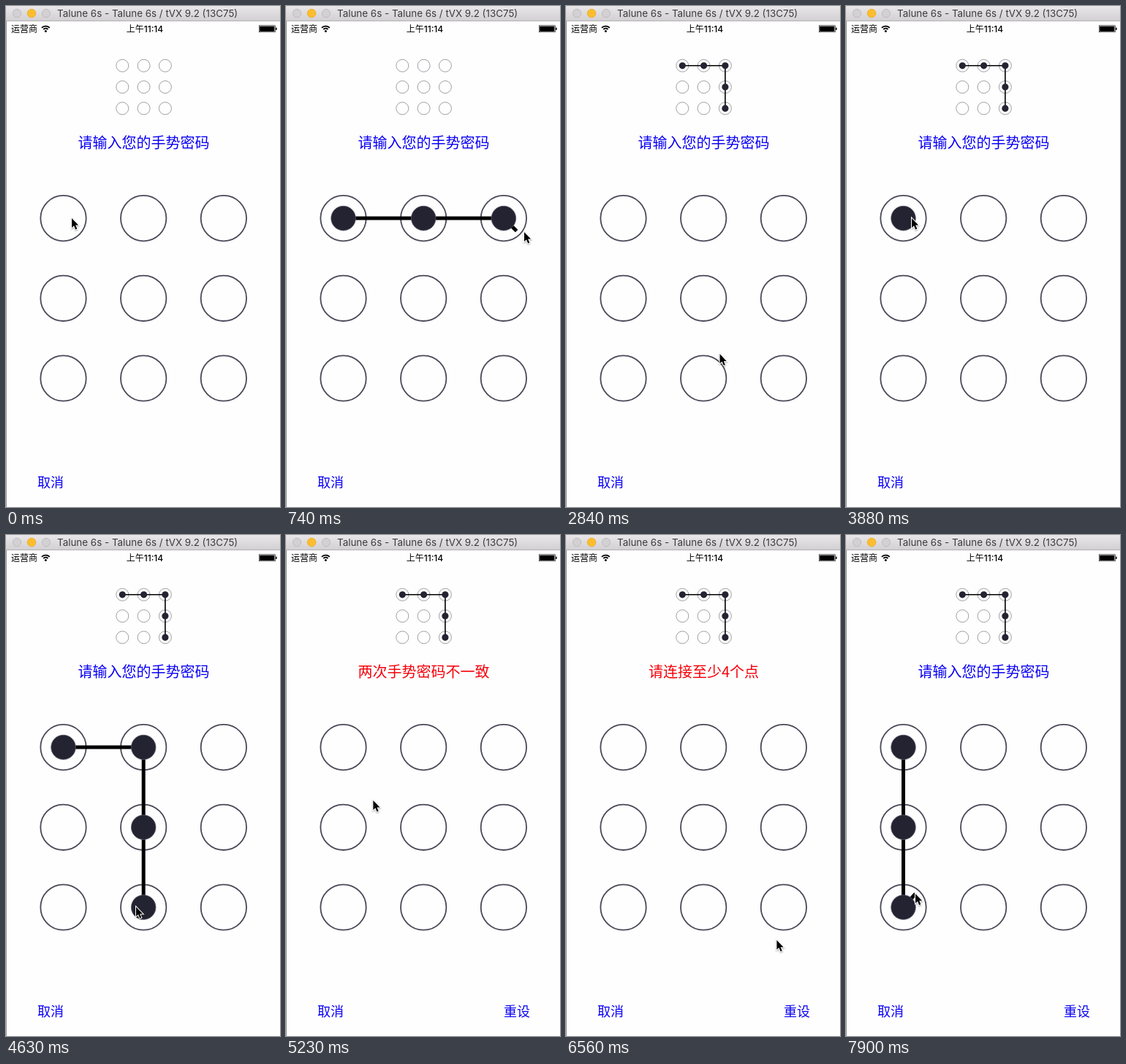
Animation, 375 px wide and 687 px high, one loop 8 s. Source, as an HTML page with a canvas:

```html
<!DOCTYPE html>
<html lang="zh-CN">
<head>
<meta charset="utf-8">
<style>
  html, body { margin: 0; width: 100%; height: 100%; overflow: hidden; background: #fff; }
  canvas { display: block; }
</style>
</head>
<body>
<canvas id="stage" width="375" height="687"></canvas>
<script>
const ctx = document.getElementById('stage').getContext('2d');
const LOOP = 8000, TICK = 149.1, TICK_SHIFT = 9.2, TOUCH_LAG = 0.15;
const INK = '#242331', BLUE = '#0a00f5', RED = '#f5000a';
const CJK = '"Noto Sans CJK SC", "Noto Sans CJK", sans-serif';
const PROMPT = '请输入您的手势密码';

const grid = (x, y, gap) =>
  Array.from({ length: 9 }, (_, i) => [x + i % 3 * gap, y + Math.floor(i / 3) * gap]);
const pad = grid(78.5, 291.1, 109.7);
const preview = grid(159.3, 81.8, 29.3);

// Times are in ticks; the pointer waits at the end of each leg.
const HOME = [90, 291];
const legs = [
  { from: 1, to: 7, via: [pad[1], [326, 310], [294, 500]] },
  { from: 10, to: 14, via: [[301, 617]] },
  { from: 16, to: 23, via: [HOME] },
  { from: 26, to: 31, via: [pad[1], [178, 510]] },
  { from: 33, to: 36, via: [HOME] },
  { from: 37, to: 39.3, via: [pad[1], [300, 284]] },
  { from: 42, to: 44.6, via: [[285, 637]] },
  { from: 45, to: 48, via: [HOME] },
  { from: 49, to: 52.8, via: [[86, 400], [95, 492]] }
];
const strokes = [
  { press: 1, release: 10 },
  { press: 24, release: 33, error: '两次手势密码不一致' },
  { press: 37, release: 42, error: '请连接至少4个点' },
  { press: 49, release: Infinity }
];

function along(points, f) {
  const s = Math.min(f, 1) * (points.length - 1);
  const i = Math.min(Math.floor(s), points.length - 2);
  return points[i].map((v, axis) => v + (points[i + 1][axis] - v) * (s - i));
}

function pointer(tick) {
  const i = legs.findLastIndex(leg => leg.from <= tick);
  if (i < 0) return HOME;
  const { from, to, via } = legs[i];
  const origin = i ? legs[i - 1].via.at(-1) : HOME;
  return along([origin, ...via], (tick - from) / (to - from));
}

const touch = tick => pointer(tick - TOUCH_LAG);

function touchedNodes(start, end) {
  const hit = new Set();
  for (let t = start; t <= end + 0.01; t += 0.1) {
    const [x, y] = touch(t);
    pad.forEach(([cx, cy], i) => { if (Math.hypot(x - cx, y - cy) < 32) hit.add(i); });
  }
  return [...hit];
}
const savedPattern = touchedNodes(strokes[0].press, strokes[0].release - 1);

function circle([x, y], r, fill, stroke, width = 1) {
  ctx.beginPath();
  ctx.arc(x, y, r, 0, Math.PI * 2);
  if (fill) { ctx.fillStyle = fill; ctx.fill(); }
  if (stroke) { ctx.strokeStyle = stroke; ctx.lineWidth = width; ctx.stroke(); }
}

function polyline(points, width) {
  ctx.beginPath();
  points.forEach(p => ctx.lineTo(...p));
  ctx.strokeStyle = '#000';
  ctx.lineWidth = width;
  ctx.stroke();
}

function text(str, x, y, font, color, align = 'left') {
  ctx.font = font;
  ctx.fillStyle = color;
  ctx.textAlign = align;
  ctx.fillText(str, x, y);
}

function drawWindow() {
  ctx.fillStyle = '#fefefe';
  ctx.fillRect(0, 0, 375, 687);
  const bar = ctx.createLinearGradient(0, 0, 0, 20);
  bar.addColorStop(0, '#e9e7e9');
  bar.addColorStop(1, '#d2d0d2');
  ctx.fillStyle = bar;
  ctx.fillRect(0, 0, 375, 20);
  ctx.fillStyle = '#b4b2b4';
  ctx.fillRect(0, 20, 375, 1);
  ctx.fillStyle = '#9b9b9b';
  ctx.fillRect(0, 21, 1, 666);
  circle([15, 10], 5.6, '#d3d1d3', '#bebcbe');
  circle([35, 10], 5.8, '#fdbd2e', '#e9ab27', 0.8);
  circle([55, 10], 5.6, '#d3d1d3', '#bebcbe');
  text('Talune 6s - Talune 6s / tVX 9.2 (13C75)', 70, 15, '13.4px Inter, sans-serif', '#3c3c3c');
}

function drawStatusBar() {
  text('运营商', 7, 35.5, '12px ' + CJK, '#000');
  text('上午11:14', 190, 35.5, '500 12px Inter, ' + CJK, '#000', 'center');
  circle([54.3, 34.5], 1.5, '#000');
  ctx.strokeStyle = '#000';
  ctx.lineWidth = 1.9;
  for (const r of [4.2, 7.4]) {
    ctx.beginPath();
    ctx.arc(54.3, 35, r, -Math.PI * 0.76, -Math.PI * 0.24);
    ctx.stroke();
  }
  ctx.lineWidth = 0.6;
  ctx.strokeRect(346.3, 26.8, 22, 9);
  ctx.fillStyle = '#000';
  ctx.fillRect(347.2, 27.7, 20.2, 7.2);
  ctx.fillRect(369.2, 29.7, 1.5, 3.2);
}

function drawPreview(saved) {
  preview.forEach(p => circle(p, 8.5, null, '#77767f', 0.7));
  if (!saved) return;
  const points = savedPattern.map(i => preview[i]);
  polyline(points, 1.6);
  points.forEach(p => circle(p, 4.6, INK));
}

function drawPad(tick, stroke) {
  pad.forEach(p => circle(p, 31.2, null, '#4a4957', 1.8));
  if (!stroke || tick >= stroke.release) return;
  const points = touchedNodes(stroke.press, tick).map(i => pad[i]);
  polyline([...points, touch(tick)], 5);
  points.forEach(p => circle(p, 16.8, INK, '#5d5c69', 0.8));
}

function drawPointer([x, y]) {
  ctx.save();
  ctx.translate(x, y);
  ctx.shadowColor = 'rgba(0,0,0,.35)';
  ctx.shadowBlur = 2;
  ctx.shadowOffsetY = 1;
  const arrow = new Path2D('M0 0V13L3 10.3 5.2 15.5 7.3 14.6 5.2 9.6H9.2Z');
  ctx.strokeStyle = '#fff';
  ctx.lineWidth = 2;
  ctx.stroke(arrow);
  ctx.shadowColor = 'transparent';
  ctx.fillStyle = '#000';
  ctx.fill(arrow);
  ctx.restore();
}

function draw(now) {
  const tick = Math.floor((now % LOOP + TICK_SHIFT) / TICK);
  const stroke = strokes.findLast(s => s.press <= tick);
  const error = stroke && tick >= stroke.release && stroke.error;
  drawWindow();
  drawStatusBar();
  drawPreview(tick >= strokes[0].release);
  text(error || PROMPT, 188.5, 194.5, '20px ' + CJK, error ? RED : BLUE, 'center');
  drawPad(tick, stroke);
  text('取消', 43, 660, '18px ' + CJK, BLUE);
  if (tick >= strokes[1].release) text('重设', 298, 660, '18px ' + CJK, BLUE);
  drawPointer(pointer(tick));
}

const start = performance.now();
function loop() {
  draw(performance.now() - start);
  requestAnimationFrame(loop);
}
loop();
</script>
</body>
</html>
```
